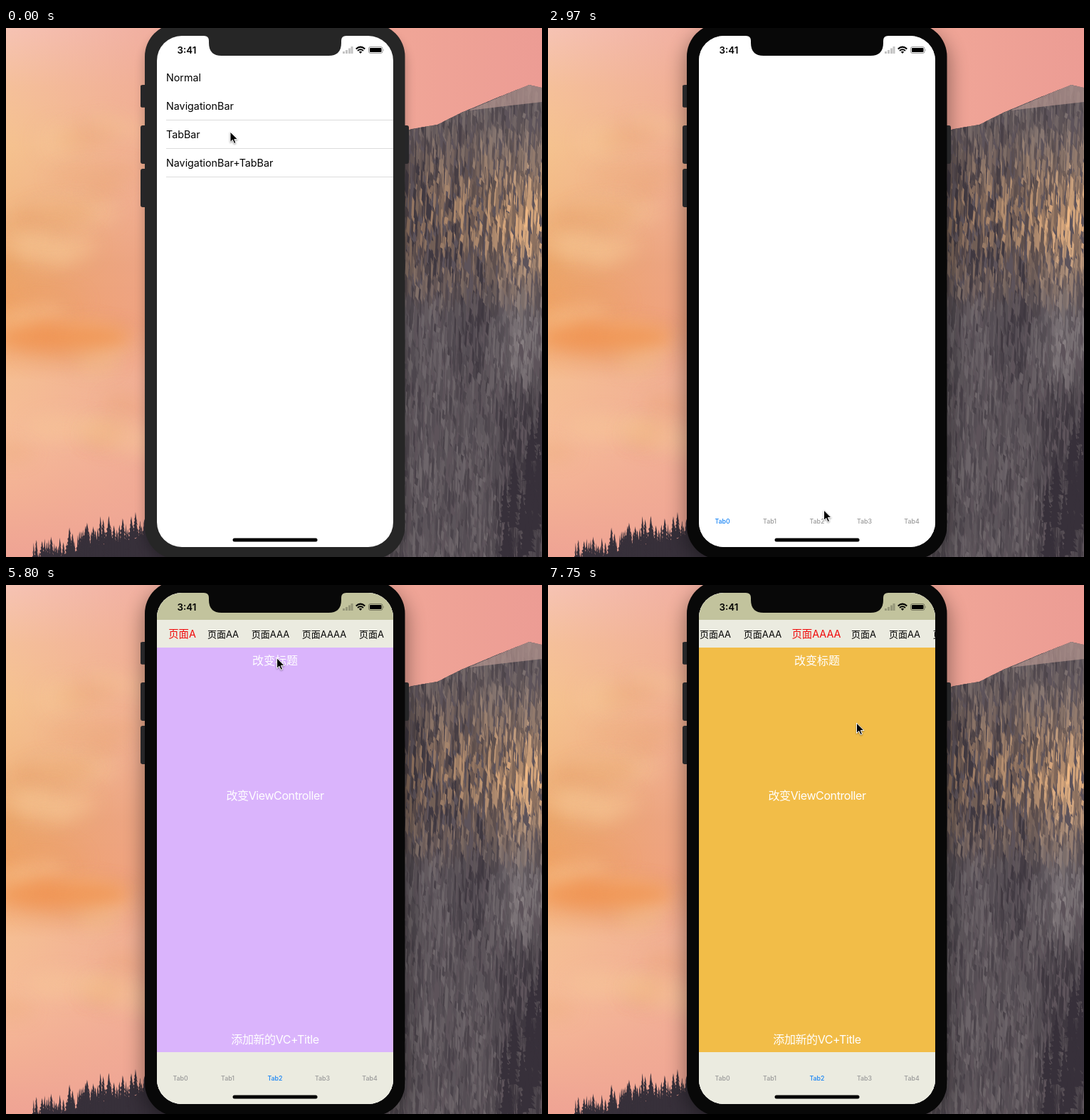
An HTML page with a canvas that plays this animation: 753 px wide and 744 px high, repeating every 8 s.

```html
<!DOCTYPE html>
<html lang="zh-CN">
<head>
<meta charset="utf-8">
<style>
html, body { margin: 0; width: 100%; height: 100%; overflow: hidden; }
canvas, svg { position: absolute; left: 0; top: 0; width: 753px; height: 744px; }
svg { font-family: Inter, "Noto Sans CJK SC", "Noto Sans CJK", sans-serif; }
.list { font-size: 14.3px; }
.tabs { font-size: 8.8px; font-weight: 500; text-anchor: middle; }
.titles { text-anchor: middle; }
.labels { font-size: 16px; text-anchor: middle; fill: #fff; }
.tight { letter-spacing: -.4px; }
#cursor { filter: drop-shadow(0 1px 1px #0006); }
</style>
</head>
<body>
<canvas id="scene" width="753" height="744"></canvas>
<svg viewBox="0 0 753 744">
  <defs>
    <filter id="wide" x="-1" width="3"><feGaussianBlur stdDeviation="14"/></filter>
    <filter id="near"><feGaussianBlur stdDeviation="7"/></filter>
    <clipPath id="screen"><rect x="212" y="11" width="332" height="719" rx="35"/></clipPath>
    <path id="button" d="M0 3q0-3 3-3h6v54h-6q-3 0-3-3z" fill="#262628"/>
  </defs>

  <rect id="shadow" x="193" y="4" width="370" height="750" rx="48"/>
  <use href="#button" transform="translate(189 80) scale(1 .59)"/>
  <use href="#button" x="189" y="137"/>
  <use href="#button" x="189" y="198"/>
  <use href="#button" transform="translate(566 137) scale(-1 1)"/>
  <rect id="bezel" x="195" y="-6" width="365.500" height="753" rx="46"/>

  <g clip-path="url(#screen)">
    <rect x="212" y="11" width="332" height="719" fill="#fff"/>
    <path d="M225 129.500H544M225 169.500H544M225 209.500H544" stroke="#dcdcdc"/>
    <rect id="row" x="212" y="129" width="332" height="41" fill="#d8d8d8"/>
    <g id="list" class="list"></g>
    <g id="modal">
      <rect x="212" y="11" width="332" height="720" fill="#fff"/>
      <g id="pager">
        <rect x="212" y="11" width="332" height="39" fill="#c2c39d"/>
        <rect x="212" y="49" width="332" height="682" fill="#ebebe0"/>
        <rect id="page" x="212" y="88" width="332" height="569"/>
        <g id="titles" class="titles"></g>
        <g class="labels">
          <text x="378" y="112">改变标题</text>
          <text x="378" y="302" class="tight">改变ViewController</text>
          <text x="378" y="645" class="tight">添加新的VC+Title</text>
        </g>
      </g>
      <g id="tabs" class="tabs"></g>
    </g>
    <path id="notch" d="M278 10H478V11Q471 11 471 18V21Q471 39 453 39H303Q285 39 285 21V18Q285 11 278 11Z"/>
    <text x="254" y="36" font-size="13.3" font-weight="600" text-anchor="middle">3:41</text>
    <path d="M473 33h3v3h-3zM477 31h3v5h-3zM481 28.500h3v7.500h-3zM484.500 26h3v10h-3z" opacity=".23"/>
    <path d="M491.700 29.500Q498 23.800 504.300 29.500M494 32Q498 28.500 502 32" fill="none" stroke="#000" stroke-width="2"/>
    <path d="M495.800 33.600Q498 31.800 500.200 33.600L498 36Z"/>
    <rect x="509.500" y="26.500" width="19.500" height="9" rx="2.500" fill="none" stroke="#000" stroke-opacity=".4"/>
    <rect x="511" y="28" width="16.500" height="6" rx="1"/>
    <path d="M530 29.500q1.500 1.500 0 3z" opacity=".4"/>
    <rect x="318.500" y="717.500" width="119" height="5" rx="2.500"/>
  </g>
  <path id="cursor" d="M0 0V14.500L3.300 11.400 5.600 16.500 8 15.500 5.800 10.600H10.500Z" stroke="#fff" stroke-linejoin="round"/>
</svg>
<script>
const $ = id => document.getElementById(id);
const clamp = v => Math.min(1, Math.max(0, v));
const mix = (a, b, p) => a + (b - a) * p;
const bell = (v, center, spread) => Math.exp(-(((v - center) / spread) ** 2));
const mixColor = (a, b, p) => a.map((v, i) => mix(v, b[i], p));

let seed = 7;
const random = (a = 0, b = 1) => {
  seed = seed * 16807 % 2147483647;
  return mix(a, b, seed / 2147483647);
};

// Scenery, painted once
const ctx = $('scene').getContext('2d');

function gradient(x1, y1, colors) {
  const g = ctx.createLinearGradient(0, 0, x1, y1);
  colors.forEach((c, i) => g.addColorStop(i / (colors.length - 1), c));
  ctx.fillStyle = g;
  ctx.fillRect(0, 0, 753, 744);
}

function paintSky() {
  gradient(0, 744, ['#f6c3b4', '#f5c09a', '#f5c28f', '#f2b985', '#eba66b', '#f1a163', '#f5be93', '#f6bc98', '#f3b094', '#efa394']);
  gradient(753, 0, ['#eea49500', '#eea49599', '#f0a597', '#f0a597', '#ec9c94']);
  ctx.filter = 'blur(12px)';
  for (let i = 0; i < 24; i++) {
    ctx.fillStyle = i % 2 ? '#f8cb9a66' : '#e7a06a40';
    ctx.beginPath();
    ctx.ellipse(random(0, 180), random(70, 640), random(25, 70), random(10, 24), random(-.3, .3), 0, 7);
    ctx.fill();
  }
  ctx.fillStyle = '#f1934fcc';
  ctx.beginPath();
  ctx.ellipse(80, 435, 95, 20, 0, 0, 7);
  ctx.fill();
  ctx.filter = 'none';
}

// Sunlit upper face, brighter to the right; grey below with a dark lower corner
function rockColor(x, y) {
  const across = (x - 560) / 193;
  const sun = bell(y, 270, 110) * clamp((410 - y) / 40);
  const level = mix(.3, .12 + .6 * across, sun)
    - .2 * bell(x, 660, 28) * bell(y, 390, 110)
    + .3 * bell(x, 725, 40) * bell(y, 440, 50)
    - .25 * clamp((x - 680) / 30) * clamp((y - 500) / 40);
  const bright = mixColor([158, 149, 150], [244, 188, 135], sun);
  return mixColor([63, 56, 64], bright, clamp(level + random(-.35, .35) * mix(.6, 1, sun)));
}

function paintCliff() {
  ctx.save();
  ctx.beginPath();
  for (const [x, y] of [[520, 160], [570, 142], [606, 136], [640, 119], [690, 98], [735, 80], [753, 84], [753, 744], [520, 744]]) ctx.lineTo(x, y);
  ctx.clip();
  ctx.fillStyle = '#5d535a';
  ctx.fillRect(520, 80, 233, 664);
  for (let i = 0; i < 4500; i++) {
    const x = random(520, 753), y = random(70, 744), w = random(1, 4.5), h = random(8, 48);
    ctx.fillStyle = `rgb(${rockColor(x, y + h / 2)})`;
    ctx.beginPath();
    ctx.moveTo(x, y);
    ctx.lineTo(x + w, y + h * .2);
    ctx.lineTo(x + w * .6, y + h);
    ctx.lineTo(x - w * .4, y + h * .7);
    ctx.fill();
  }
  // Summit slope
  ctx.fillStyle = '#b59690b0';
  ctx.beginPath();
  for (const [x, y] of [[650, 116], [735, 79], [753, 83], [753, 104], [700, 110]]) ctx.lineTo(x, y);
  ctx.fill();
  ctx.restore();
}

function paintTree(x, y, height, width) {
  ctx.beginPath();
  ctx.moveTo(x, y);
  for (const side of [1, -1]) {
    for (let i = 1; i <= 8; i++) {
      const tier = side > 0 ? i : 9 - i, w = side * width * tier / 8, ty = y + height * tier / 8;
      ctx.lineTo(x + w * random(.6, 1.3), ty);
      ctx.lineTo(x + w * .45, ty - 2);
    }
  }
  ctx.fill();
}

function paintWoods() {
  ctx.fillStyle = '#37303a';
  for (let x = 36; x < 232; x += random(2, 5)) {
    const top = 738 - 54 * Math.sqrt((x - 35) / 160);
    paintTree(x, top + random(-10, 18), random(35, 55), random(4, 9));
    ctx.fillRect(x - 3, top + 32, 8, 80);
  }
  for (let i = 0; i < 30; i++) {
    const x = random(700, 756);
    paintTree(x, 510 + (753 - x) * 2.2 + random(0, 150), 60, 10);
  }
}

paintSky();
paintCliff();
paintWoods();

// Interface
function addText(parent, x, y, text) {
  const el = document.createElementNS('http://www.w3.org/2000/svg', 'text');
  el.setAttribute('x', x);
  el.setAttribute('y', y);
  el.textContent = text;
  return $(parent).appendChild(el);
}
['Normal', 'NavigationBar', 'TabBar', 'NavigationBar+TabBar'].forEach((s, i) => addText('list', 225, 75 + 40 * i, s));
const tabs = [0, 1, 2, 3, 4].map(i => addText('tabs', 245 + 66.5 * i, 697, 'Tab' + i));

let left = 230;
const titles = [1, 2, 3, 4, 1, 2, 3].map(count => {
  const width = 26 + 9 * count;
  const title = addText('titles', left + width / 2, 74, '页面' + 'A'.repeat(count));
  left += width + 18;
  return title;
});

// Pointer moves along quadratic curves: first and last step, control point, end point
const start = [315, 146];
const moves = [
  { from: 0, to: 1, via: [313, 147], end: [313, 148] },
  { from: 15, to: 20, via: [535, 890], end: [387.5, 678] },
  { from: 23, to: 31, via: [245, -95], end: [379, 79] },
  { from: 31, to: 38, via: [383, 160], end: [369, 98] },
  { from: 38, to: 45, via: [410, 120], end: [444, 69] },
  { from: 48, to: 52, via: [440, 140], end: [433.5, 194] }
];
function pointer(step) {
  let at = start;
  for (const { from, to, via, end } of moves) {
    const p = clamp((step - from) / (to - from));
    at = mixColor(mixColor(at, via, p), mixColor(via, end, p), p);
  }
  return at;
}

const set = (id, name, value) => $(id).setAttribute(name, value);
const show = (id, on) => set(id, 'visibility', on ? 'inherit' : 'hidden');
const place = (id, x, y) => set(id, 'transform', `translate(${x} ${y})`);

function draw(now) {
  // The screen updates in steps of about 149 ms
  const step = Math.floor((now % 8000 + 20) / 149);
  const active = step >= 9, paging = step >= 22, switched = step >= 48;

  for (const id of ['bezel', 'notch']) set(id, 'fill', active ? '#080808' : '#262626');
  set('shadow', 'filter', active ? 'url(#wide)' : 'url(#near)');
  set('shadow', 'opacity', active ? .4 : .2);
  show('row', active);
  show('pager', paging);
  place('modal', 0, step < 11 ? 720 : Math.floor(170 * Math.exp(-2 * (step - 11))));

  tabs.forEach((tab, i) => tab.setAttribute('fill', i === (paging ? 2 : 0) ? '#1583f5' : '#999'));
  set('page', 'fill', switched ? '#f2bd48' : '#dab4fc');
  place('titles', -70 * clamp((step - 47) / 2), 0);
  titles.forEach((title, i) => {
    const selected = i === (switched ? 3 : 0);
    title.setAttribute('fill', selected ? '#f00c0c' : '#000');
    title.setAttribute('font-size', selected ? 14.4 : 13);
  });
  place('cursor', ...pointer(step));
  requestAnimationFrame(draw);
}
requestAnimationFrame(draw);
</script>
</body>
</html>
```
